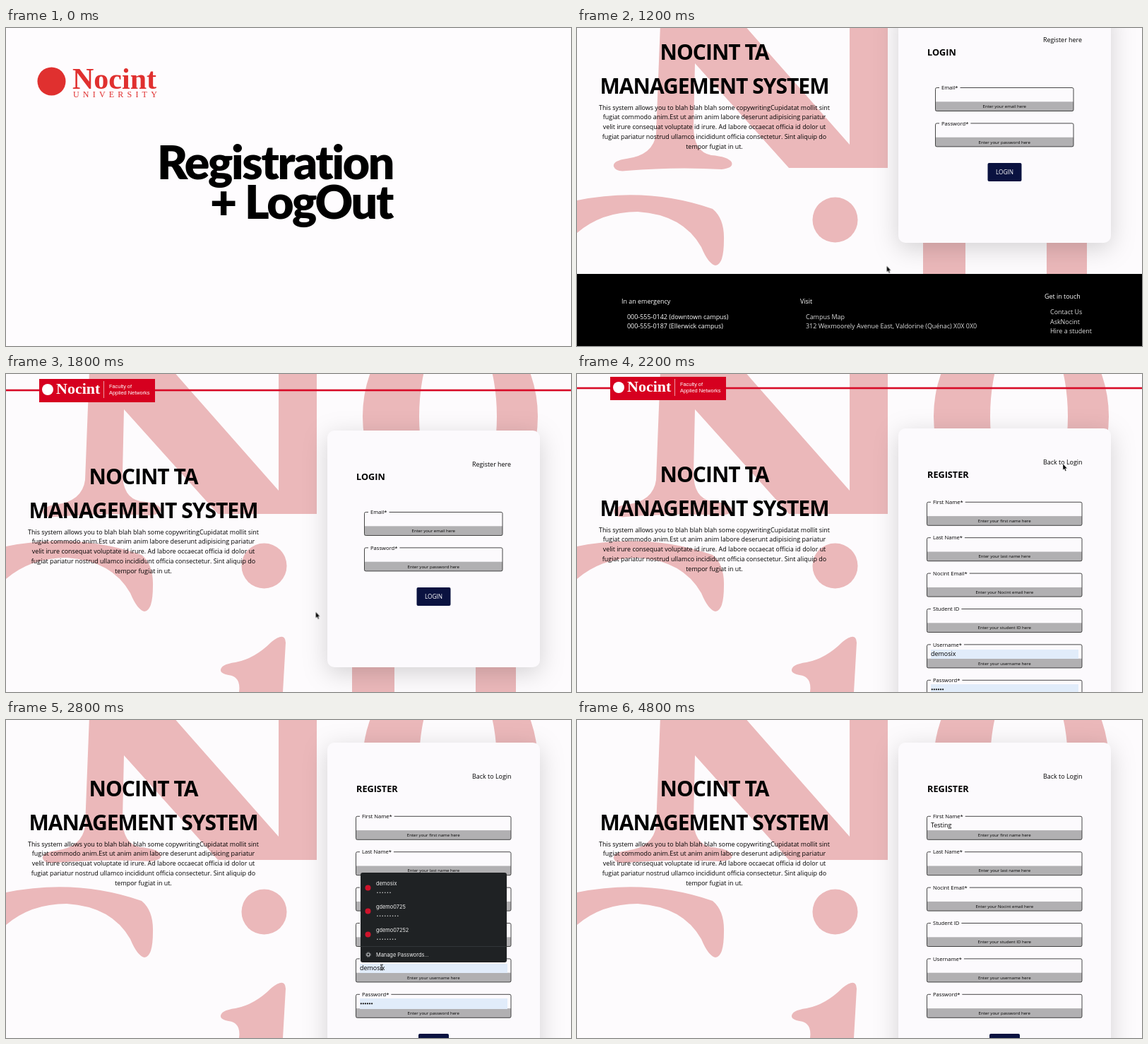
Write an HTML page that moves like this. It is 800x450 px and loops after 5 s.

```html
<!DOCTYPE html>
<html lang="en">
<head>
<meta charset="utf-8">
<title>Registration</title>
<style>
html, body { margin: 0; width: 100%; height: 100%; overflow: hidden; background: #fdfbfd; }
svg { display: block; width: 100vw; height: 100vh; }
text { font: 8.95px "Open Sans", "Noto Sans", sans-serif; white-space: pre; }
.mid { text-anchor: middle; }
.white { fill: #fff; }
.soft { fill: #ddd; }
.title { font-size: 30px; font-weight: 700; letter-spacing: -1px; }
.head { font-size: 12.7px; font-weight: 700; }
.label { font-size: 7.6px; }
.hint { font-size: 6.1px; }
.big { font: 900 66px Lato, sans-serif; letter-spacing: -2.3px; }
.serif { font-family: "Liberation Serif", serif; font-weight: 700; }
.unit { font: 7.4px "Liberation Sans", sans-serif; }
.menu { font: 7.4px Inter, sans-serif; fill: #eee; }
.card { fill: #fcfafd; filter: drop-shadow(0 8px 17px rgba(0, 0, 0, .17)); }

/* Every change is a hard cut on a 200 ms grid: 4% of the loop. */
.step { animation: 5s step-end infinite; }
.intro { animation-name: intro; }
.page { animation-name: scroll; }
.login { animation-name: login; }
.register { animation-name: register; }
.autofill { animation-name: autofill; }
.dropdown { animation-name: dropdown; }
.arrow { animation-name: arrow; }
.beam { animation-name: beam; }
.type1 { animation-name: type1; }
.type2 { animation-name: type2; }
.type3 { animation-name: type3; }
.caret { animation-name: caret; }

@keyframes intro { 0% { opacity: 1 } 20%, 100% { opacity: 0 } }
@keyframes scroll {
  0%, 20% { transform: translateY(0) }
  24% { transform: translateY(-111px) }
  28% { transform: translateY(-101px) }
  32% { transform: translateY(-40px) }
  36% { transform: translateY(0) }
  40% { transform: translateY(-3px) }
  48% { transform: translateY(-20px) }
  52%, 100% { transform: translateY(-48px) }
}
@keyframes login { 0% { opacity: 1 } 44%, 100% { opacity: 0 } }
@keyframes register { 0% { opacity: 0 } 44%, 100% { opacity: 1 } }
@keyframes autofill { 0% { opacity: 1 } 60%, 100% { opacity: 0 } }
@keyframes dropdown {
  0% { opacity: 0; transform: translateY(0) }
  56% { opacity: 1; transform: translateY(0) }
  64% { opacity: 1; transform: translateY(50.3px) }
  76%, 100% { opacity: 0; transform: translateY(50.3px) }
}
@keyframes arrow {
  0% { opacity: 1; transform: translate(438.5px, 336.5px) }
  40% { opacity: 1; transform: translate(688px, 127px) }
  48%, 100% { opacity: 0; transform: translate(688px, 127px) }
}
@keyframes beam {
  0% { opacity: 0; transform: translate(581px, 203px) }
  48% { opacity: 1; transform: translate(581px, 203px) }
  52% { opacity: 1; transform: translate(545px, 300px) }
  56% { opacity: 1; transform: translate(532px, 350px) }
  60% { opacity: 0; transform: translate(532px, 350px) }
  64% { opacity: 1; transform: translate(540px, 401px) }
  72% { opacity: 1; transform: translate(587px, 150px) }
  76%, 100% { opacity: 0; transform: translate(587px, 150px) }
}
@keyframes type1 { 0% { fill-opacity: 0 } 80%, 100% { fill-opacity: 1 } }
@keyframes type2 { 0% { fill-opacity: 0 } 84%, 100% { fill-opacity: 1 } }
@keyframes type3 { 0% { fill-opacity: 0 } 88%, 100% { fill-opacity: 1 } }
@keyframes caret { 0% { opacity: 0 } 88% { opacity: 1 } 92%, 100% { opacity: 0 } }
</style>
</head>
<body>
<svg viewBox="0 0 800 450" preserveAspectRatio="none">
  <rect width="800" height="450" fill="#fdfbfd"/>

  <g fill="#ebb8ba">
    <path d="M118-5 112 150Q108 180 70 185 50 188 52 196 55 204 70 202 140 196 205 200 222 198 219 190 214 182 190 180 165 175 165 140L167 50 300 198H440V-5H386V165L236-5Z"/>
    <path fill-rule="evenodd" d="M505 60a124 150 0 0 1 248 0a124 150 0 0 1-248 0ZM585 60a55 130 0 0 0 110 0a55 130 0 0 0-110 0Z"/>
    <path d="M0 244Q100 224 192 256 209 270 208 300 208 335 196 336 186 334 176 310 150 264 86 260 35 260 0 290Z"/>
    <circle cx="365.500" cy="271.500" r="32"/>
    <path d="M304 420Q303 411 325 408 352 403 376 379 395 364 396 380L392 450H330Q333 428 315 426 305 424 304 420Z"/>
    <path d="M490 290h60v160h-60ZM665 290h57v160h-57Z"/>
  </g>

  <g class="step page">
    <rect y="21.700" width="800" height="2.600" fill="#d80a27"/>
    <rect x="47" y="7" width="164" height="33" fill="#d6001f"/>
    <circle class="white" cx="59" cy="22" r="8"/>
    <text class="serif white" x="71" y="28" style="font-size:22px">Nocint</text>
    <path d="M138.500 10V34" stroke="#fff" stroke-width=".6"/>
    <text class="unit white" x="146" y="20">Faculty of</text>
    <text class="unit white" x="146" y="29">Applied Networks</text>

    <text class="title mid" x="194.500" y="156">NOCINT TA</text>
    <text class="title mid" x="194.500" y="204">MANAGEMENT SYSTEM</text>
    <g id="blurb"></g>

    <g class="step login">
      <rect class="card" x="455" y="80" width="301" height="335" rx="10"/>
      <text x="660" y="131">Register here</text>
      <text class="head" x="496" y="150">LOGIN</text>
      <g id="loginFields"></g>
      <rect x="581.500" y="302" width="48" height="26" rx="2" fill="#0a1240"/>
      <text class="mid white" x="605.500" y="317.700" style="font-size:8.3px">LOGIN</text>
      <rect y="459" width="800" height="200"/>
      <g id="footer"></g>
    </g>

    <g class="step register">
      <rect class="card" x="455" y="80" width="301" height="560" rx="10"/>
      <text x="660" y="131">Back to Login</text>
      <text class="head" x="496" y="150">REGISTER</text>
      <g id="registerFields"></g>
      <rect x="584" y="492" width="43" height="26" rx="2" fill="#0a1240"/>
      <g class="step autofill">
        <path d="M501 393h209v13H501ZM501 442h209v15H501Z" fill="#e1ecfa"/>
        <text x="501" y="402">demosix</text>
        <g id="secret"></g>
      </g>
      <text x="501" y="200"><tspan class="step type1">T</tspan><tspan class="step type2">est</tspan><tspan class="step type3">ing</tspan></text>
      <path class="step caret" d="M532 192V203" stroke="#222" stroke-width=".7"/>
    </g>
  </g>

  <g class="step dropdown">
    <rect x="502" y="216" width="207" height="127" rx="3" fill="#1f2224"/>
    <g id="accounts"></g>
    <path d="M502 320.500H709" stroke="#3c4043" stroke-width=".7"/>
    <circle cx="513" cy="332" r="2" fill="none" stroke="#b8babd" stroke-width="1.200"/>
    <circle cx="513" cy="332" r="3.200" fill="none" stroke="#b8babd" stroke-width="1" stroke-dasharray="1.260"/>
    <text class="menu" x="524" y="334.800">Manage Passwords...</text>
  </g>

  <path class="step arrow" d="M0 0v9l2-1.800 1.400 3.200 1.500-.7-1.400-3h2.700Z" stroke="#fff" stroke-width=".5"/>
  <path class="step beam" d="M-2-4Q0-4 0-3 0-4 2-4M0-3V3M-2 4Q0 4 0 3 0 4 2 4" fill="none" stroke="#111" stroke-width=".9"/>

  <g class="step intro">
    <rect width="800" height="450" fill="#fefcfe"/>
    <g fill="#e0302f">
      <circle cx="64.500" cy="75.500" r="20"/>
      <text class="serif" x="94" y="86" style="font-size:42px">Nocint</text>
      <text class="serif" x="95" y="98" style="font-size:12px;font-weight:400;letter-spacing:5.2px">UNIVERSITY</text>
    </g>
    <text class="big mid" x="381" y="214">Registration</text>
    <text class="big mid" x="418" y="270">+ LogOut</text>
  </g>
</svg>
<script>
const byId = id => document.getElementById(id);

function add(parent, tag, attrs, content = "") {
  const node = document.createElementNS("http://www.w3.org/2000/svg", tag);
  for (const key in attrs) node.setAttribute(key, attrs[key]);
  node.textContent = content;
  return parent.appendChild(node);
}

function text(parent, x, y, content, cls = "") {
  return add(parent, "text", { x, y, class: cls }, content);
}

function dots(parent, x, y, count, gap, r, fill) {
  for (let i = 0; i < count; i++) add(parent, "circle", { cx: x + i * gap, cy: y, r, fill });
}

function field(parent, x, y, width, label, hint) {
  add(parent, "rect", { x, y: y + 19.8, width, height: 13.2, fill: "#b1b0b2" });
  add(parent, "rect", { x, y, width, height: 33, rx: 2, fill: "none", stroke: "#333", "stroke-width": .9 });
  const gap = add(parent, "rect", { x: x + 5.5, y: y - 2, height: 4, fill: "#fcfafd" });
  const legend = text(parent, x + 8.5, y + 2.6, label, "label");
  gap.setAttribute("width", legend.getComputedTextLength() + 6);
  text(parent, x + width / 2, y + 28.7, `Enter your ${hint} here`, "hint mid");
}

[
  "This system allows you to blah blah blah some copywritingCupidatat mollit sint",
  "fugiat commodo anim.Est ut anim anim labore deserunt adipisicing pariatur",
  "velit irure consequat voluptate id irure. Ad labore occaecat officia id dolor ut",
  "fugiat pariatur nostrud ullamco incididunt officia consectetur. Sint aliquip do",
  "tempor fugiat in ut."
].forEach((line, i) => text(byId("blurb"), 194.5, 226.7 + i * 13.75, line, "mid"));

[["Email*", "email"], ["Password*", "password"]]
  .forEach(([label, hint], i) => field(byId("loginFields"), 507.5, 195.5 + i * 50.4, 195.5, label, hint));

[
  ["First Name*", "first name"],
  ["Last Name*", "last name"],
  ["Nocint Email*", "Nocint email"],
  ["Student ID", "student ID"],
  ["Username*", "username"],
  ["Password*", "password"]
].forEach(([label, hint], i) => field(byId("registerFields"), 495.5, 184.3 + i * 50.4, 219.5, label, hint));

dots(byId("secret"), 502.8, 449.3, 6, 3.05, 1.15, "#111");

[["demosix", 6], ["gdemo0725", 9], ["gdemo07252", 8]].forEach(([name, length], i) => {
  const list = byId("accounts"), y = 231 + i * 33;
  add(list, "circle", { cx: 512.5, cy: y + 6.5, r: 4, fill: "#d0142c" });
  text(list, 524, y + 2.8, name, "menu");
  dots(list, 526, y + 13.3, length, 3.6, .8, "#ddd");
});

[
  [63, 500.6, "In an emergency", "white"],
  [71, 522.6, "000-555-0142 (downtown campus)", "white"],
  [71, 536.4, "000-555-0187 (Ellerwick campus)", "white"],
  [316, 500.6, "Visit", "white"],
  [324, 522.6, "Campus Map", "soft"],
  [324, 536.4, "312 Wexmoorely Avenue East, Valdorine (Quénac) X0X 0X0", "soft"],
  [662, 494, "Get in touch", "white"],
  [670, 516, "Contact Us", "soft"],
  [670, 529.6, "AskNocint", "soft"],
  [670, 543.4, "Hire a student", "soft"]
].forEach(item => text(byId("footer"), ...item));
</script>
</body>
</html>
```
